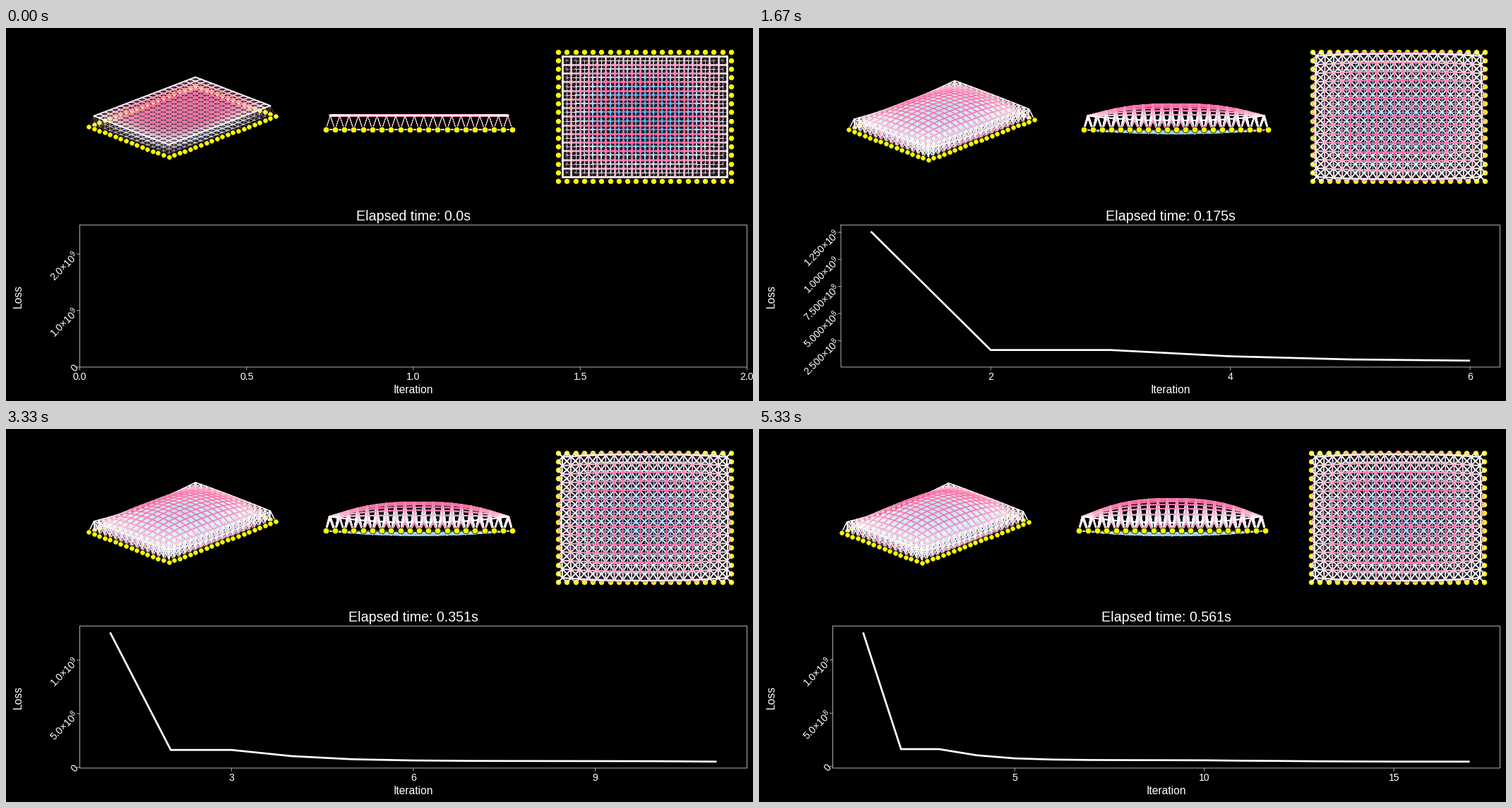
These frames come from a looping animation (1058x529 px, 5660 ms). A matplotlib script:

```python
import numpy as np
import matplotlib.pyplot as plt
from matplotlib.animation import FuncAnimation
from matplotlib.collections import LineCollection

W, H, PT = 1058, 529, 0.72
STEPS, LOOP = 17, 5660
NX, NY, DEPTH = 20, 15, 1.515
TOP, BOTTOM, RIGHT = 279.4, 480.9, 1049.5

PINK = np.array([1.0, 0.44, 0.65])
BLUE = np.array([0.16, 0.66, 0.95])
YELLOW = "#ffff00"

LOSS = 1e7 * np.array([125.8, 16.3, 16.3, 10.5, 7.6, 6.5, 6.08, 5.97, 5.9,
                       5.8, 5.4, 5.2, 4.85, 4.7, 4.6, 4.57, 4.55])
X_STEP = [.5, .25, .5, 1, 1, 2, 2, 2, 2.5, 2.5, 3, 2.5, 2.5, 2.5, 5, 5, 5]

plt.rcParams.update({
    "font.family": "Liberation Sans",
    "mathtext.fontset": "custom",
    "mathtext.rm": "Liberation Sans",
    "mathtext.it": "Liberation Sans",
})

fig = plt.figure(figsize=(W / 100, H / 100), dpi=100, facecolor="black")
ax = fig.add_axes([0, 0, 1, 1])


def bump(t, power):
    return 1 - np.abs(2 * t - 1) ** power


def tint(color, amount):
    a = np.clip(amount, 0, 1)[:, None]
    return 1 - a + a * color


def dome(u, v):
    return np.clip(np.sin(np.pi * u) * np.sin(np.pi * v), 0, 1)


def grid_edges(n, m):
    ids = np.arange(n * m).reshape(n, m)
    along = np.stack([ids[:-1].ravel(), ids[1:].ravel()], 1)
    across = np.stack([ids[:, :-1].ravel(), ids[:, 1:].ravel()], 1)
    return np.vstack([along, across])


def web_edges():
    low = np.arange((NX + 1) * (NY + 1)).reshape(NX + 1, NY + 1)
    high = np.arange(NX * NY).reshape(NX, NY)
    parts = [np.stack([low[i:NX + i, j:NY + j].ravel(), high.ravel()], 1)
             for i in (0, 1) for j in (0, 1)]
    return np.vstack(parts)


LOW_X, LOW_Y = (g.ravel() for g in np.meshgrid(
    np.arange(NX + 1) - NX / 2, np.arange(NY + 1) - NY / 2, indexing="ij"))
TOP_X, TOP_Y = (g.ravel() for g in np.meshgrid(
    np.arange(NX) - (NX - 1) / 2, np.arange(NY) - (NY - 1) / 2, indexing="ij"))
LOW_U, LOW_V = LOW_X / NX + .5, LOW_Y / NY + .5
TOP_U, TOP_V = TOP_X / (NX - 1) + .5, TOP_Y / (NY - 1) + .5
RIM = (np.abs(LOW_X) == NX / 2) | (np.abs(LOW_Y) == NY / 2)
TOP_BARS, LOW_BARS, WEBS = grid_edges(NX, NY), grid_edges(NX + 1, NY + 1), web_edges()


def shape(k):
    """Node positions of both layers after step k."""
    rise = np.interp(k, [0, 1, 2, 3, 4, 5, 8, 10, 12, 13, 16],
                     [0, .35, .4, .76, 1.1, 1.29, 1.44, 1.55, 1.86, 1.86, 1.93])
    sag = np.interp(k, [0, 2, 3, 5, 8, 12], [0, .05, .12, .42, .48, .53])
    power = np.interp(k, [1, 3, 5], [1.8, 1.9, 2.6])
    pu, pv = bump(TOP_U, power) ** 1.15, bump(TOP_V, 2.2)
    z = DEPTH + rise * pu * pv - 1.2 * sag * pu * (1 - pv) ** 2
    x = TOP_X + .25 * sag * pv * (2 * TOP_U - 1)
    y = TOP_Y + .6 * sag * pu * (2 * TOP_V - 1)
    low = np.stack([LOW_X, LOW_Y, -sag * dome(LOW_U, LOW_V) ** .8], 1)
    return np.stack([x, y, z], 1), low


def bars(k):
    """Segments, colours and widths of all members."""
    top, low = shape(k)
    flat = k == 0
    mt = dome(TOP_U[TOP_BARS].mean(1), TOP_V[TOP_BARS].mean(1))
    ml = dome(LOW_U[LOW_BARS].mean(1), LOW_V[LOW_BARS].mean(1))
    wu, wv = LOW_U[WEBS[:, 0]], LOW_V[WEBS[:, 0]]
    at_rim = RIM[WEBS[:, 0]]
    along = np.maximum(np.sin(np.pi * wu) * (np.abs(wv - .5) > .49),
                       .7 * np.sin(np.pi * wv) * (np.abs(wu - .5) > .49))

    seg = np.concatenate([
        np.stack([low[LOW_BARS[:, 0]], low[LOW_BARS[:, 1]]], 1),
        np.stack([low[WEBS[:, 0]], top[WEBS[:, 1]]], 1),
        np.stack([top[TOP_BARS[:, 0]], top[TOP_BARS[:, 1]]], 1)])
    if flat:
        web_col = tint(PINK, np.full(len(WEBS), .35))
    else:
        web_col = np.where(at_rim[:, None], tint(PINK, .9 * along),
                           tint(BLUE, .32 * dome(wu, wv)))
    col = np.concatenate([
        tint(BLUE, 1.25 * ml ** 1.5 if flat else .6 * ml ** .6),
        web_col,
        tint(PINK, 1.3 * mt ** .45)])
    inner = np.clip(2.5 * ml, 0, 1)
    width = np.concatenate([
        .15 + (1.6 if flat else .9) * inner,
        np.full(len(WEBS), .3 if flat else 1.6),
        np.full(len(TOP_BARS), 2.1 if flat else 1.7)])
    return seg, col, width, low[RIM]


def draw_view(project, key, data, scale, dot, front):
    seg, col, width, rim = data
    order = np.argsort(key(seg.mean(1)), kind="stable")
    ax.add_collection(LineCollection(
        project(seg)[order], colors=col[order],
        linewidths=width[order] * scale * PT, zorder=3, capstyle="round"))
    dots = project(rim)
    near = front(rim)
    for mask, z in ((~near, 2), (near, 4)):
        ax.scatter(dots[mask, 0], dots[mask, 1], s=(dot * PT) ** 2, c=YELLOW,
                   edgecolors="black", linewidths=.8 * PT, zorder=z)


def draw_frame3d(k, wide):
    data = bars(k)
    a = 7.51 if wide else 7.57
    cx = 258.5 if wide else 249.5
    cy = np.interp(k, [0, 3, 5, 8, 10, 12, 16],
                   [132.5, 134.8, 137, 138, 138.6, 139.4, 139.5])

    def iso(p):
        x, y, z = p[..., 0], p[..., 1], p[..., 2]
        return np.stack([cx + a * (x + y),
                         cy - .3827 * a * (x - y) - 1.306 * a * z], -1)

    mx, ms = (590.6, 13.05) if wide else (585, 13.22)

    def side(p):
        return np.stack([mx + ms * p[..., 0], 144.4 - ms * p[..., 2]], -1)

    tx = 905.9 if wide else 904.5

    def plan(p):
        return np.stack([tx + 12.24 * p[..., 0], 125.4 + 12.24 * p[..., 1]], -1)

    draw_view(iso, lambda p: .653 * (p[:, 1] - p[:, 0]) + .383 * p[:, 2],
              data, .95, 7.4,
              lambda r: (r[:, 0] == -NX / 2) | (r[:, 1] == NY / 2))
    draw_view(side, lambda p: p[:, 1], data, 1.15, 8.6,
              lambda r: r[:, 1] == NY / 2)
    draw_view(plan, lambda p: p[:, 2], data, 1.25, 8.2,
              lambda r: np.full(len(r), k == 0))


def power_label(v, digits):
    if v == 0:
        return "0"
    e = int(np.floor(np.log10(v) + 1e-9))
    return rf"${v / 10 ** e:.{digits}f}{{\times}}10^{{{e}}}$"


def label(x, y, text, size, ha="center", va="baseline", **kw):
    ax.text(x, y, text, fontsize=size * PT, color="white", ha=ha, va=va,
            zorder=8, **kw)


def draw_chart(k, wide):
    n = k + 1
    left = 116 if wide else 104.5
    loss = LOSS[:n]
    if n == 1:
        x0, x1, y0, y1 = 0, 2, 0, 2 * loss[0]
    else:
        mx, my = .05 * (n - 1), .05 * (loss[0] - loss[-1])
        x0, x1, y0, y1 = 1 - mx, n + mx, loss[-1] - my, loss[0] + my

    def px(v):
        return left + (v - x0) / (x1 - x0) * (RIGHT - left)

    def py(v):
        return BOTTOM - (v - y0) / (y1 - y0) * (BOTTOM - TOP)

    grey = dict(color="#b0b0b0", lw=PT, zorder=6, snap=False)
    ax.plot([left, RIGHT, RIGHT, left, left],
            [TOP, TOP, BOTTOM, BOTTOM, TOP], **grey)

    step = X_STEP[k]
    digits = 2 if step == .25 else 1 if step % 1 else 0
    for i in range(int(np.ceil(x0 / step - 1e-9)), int(x1 / step + 1e-9) + 1):
        x = px(i * step)
        ax.plot([x, x], [BOTTOM, BOTTOM + 4], **grey)
        label(x, 498.8, f"{i * step:.{digits}f}", 14)

    step, digits = (1e9, 1) if n == 1 else (2.5e8, 3) if wide else (5e8, 1)
    for i in range(int(np.ceil(y0 / step - 1e-9)), int(y1 / step) + 1):
        y = py(i * step)
        ax.plot([left - 4, left], [y, y], **grey)
        label(left - 4.2, y - 1, power_label(i * step, digits), 14, ha="right",
              va="center", rotation=45, rotation_mode="anchor")

    if n > 1:
        ax.plot(px(np.arange(1, n + 1)), py(loss), color="white", lw=2.7 * PT,
                solid_joinstyle="miter", solid_capstyle="butt", zorder=7)

    mid = (left + RIGHT) / 2
    label(mid, 273, f"Elapsed time: {round(.03507 * k, 3)}s", 19.7)
    label(mid, 517.5, "Iteration", 15.6)
    label(17.5, 380, "Loss", 15.8, rotation=90, va="center")


def draw(k):
    ax.clear()
    ax.set_xlim(0, W)
    ax.set_ylim(H, 0)
    ax.axis("off")
    wide = 1 <= k <= 5
    draw_frame3d(k, wide)
    draw_chart(k, wide)
    return []


anim = FuncAnimation(fig, draw, frames=STEPS, interval=LOOP / STEPS,
                     init_func=lambda: [], repeat=True, repeat_delay=0)
plt.show()
```
